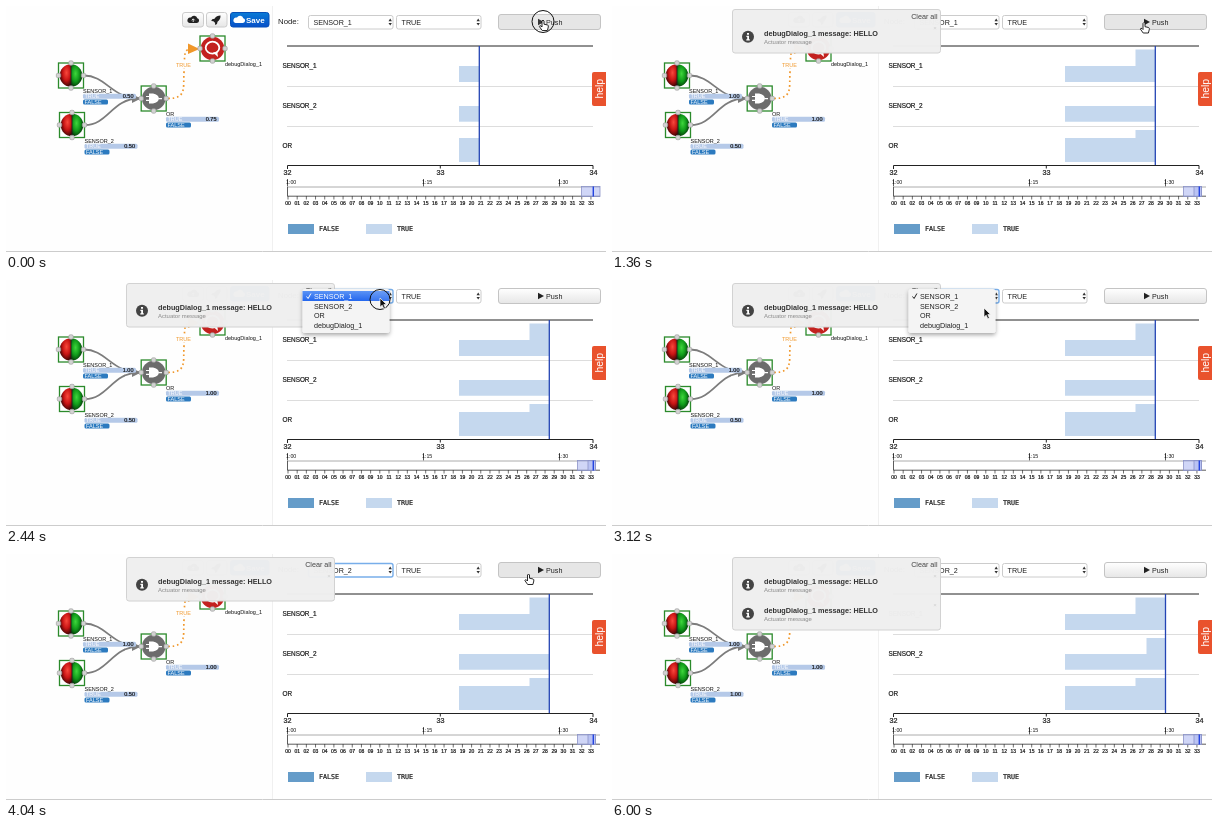
Write an HTML page that moves like this. It is 600 px wide and 246 px high and loops after 6.04 s.

```html
<!DOCTYPE html>
<html lang="en">
<head>
<meta charset="utf-8">
<title>Sensor network</title>
<style>
html, body { margin: 0; width: 100%; height: 100%; overflow: hidden; background: #fff; }
svg { display: block; width: 600px; height: 246px; }
text { font-family: "Liberation Sans", Arial, sans-serif; font-size: 7.2px; fill: #222; white-space: pre; }
.node { font-size: 5.5px; fill: #111; }
.strong { stroke: #222; stroke-width: .22; }
.mono { font-family: "DejaVu Sans Mono", monospace; font-size: 6.7px; }
.white { fill: #fff; }
</style>
</head>
<body>
<svg id="stage" viewBox="0 0 600 246">
<defs>
  <linearGradient id="btn" x2="0" y2="1"><stop stop-color="#fff"/><stop offset="1" stop-color="#e6e6e6"/></linearGradient>
  <linearGradient id="save" x2="0" y2="1"><stop stop-color="#0a7bd6"/><stop offset="1" stop-color="#0750c8"/></linearGradient>
  <linearGradient id="pick" x2="0" y2="1"><stop stop-color="#5b93f5"/><stop offset="1" stop-color="#2467ee"/></linearGradient>
  <radialGradient id="red" cx=".6" cy=".38" r=".68"><stop stop-color="#f8483c"/><stop offset=".5" stop-color="#c81414"/><stop offset="1" stop-color="#200202"/></radialGradient>
  <radialGradient id="green" cx=".4" cy=".42" r=".68"><stop stop-color="#3ed63c"/><stop offset=".5" stop-color="#109a1a"/><stop offset="1" stop-color="#021c04"/></radialGradient>
  <filter id="shadow" x="-10%" y="-10%" width="120%" height="130%"><feDropShadow dx="0" dy="2" stdDeviation="2" flood-opacity=".35"/></filter>
</defs>
<g id="graph"></g>
<g id="chart"></g>
<g id="bars"></g>
<path id="now" stroke="#2344b4" stroke-width="1.3"/>
<g id="brush"></g>
<g id="form"></g>
<g id="panel"></g>
<g id="menu"></g>
<g id="help"><rect x="586" y="66" width="16" height="34" rx="2" fill="#e9522d"/>
  <text class="white" transform="translate(596.5 92.5) rotate(-90)" style="font-size:10.4px">help</text></g>
<circle id="ring" fill="#fff" fill-opacity=".1" stroke="#111" stroke-width="1"/>
<g id="hand"><path d="M-1 1Q0-1 1 1V4.2L4.6 5Q5.6 5.4 5.3 7L4.4 10.5H-.8L-3.6 6.6Q-3.4 5.2-2 6L-1 7Z" fill="#fff" stroke="#111" stroke-width=".9"/></g>
<g id="arrow"><path d="M0 0V9.2L2.2 7.2L3.8 10.8L5.4 10L3.8 6.6H6.6Z" fill="#111" stroke="#fff" stroke-width=".7"/></g>
</svg>
<script>
const LOOP = 6040, STEP = 40;
const $ = id => document.getElementById(id);

const rect = (x, y, w, h, fill, extra = '') =>
  `<rect x="${x}" y="${y}" width="${w}" height="${h}" fill="${fill}" ${extra}/>`;
const line = (d, color, w = 1, extra = '') =>
  `<path d="${d}" fill="none" stroke="${color}" stroke-width="${w}" ${extra}/>`;
const shape = (d, fill, extra = '') => `<path d="${d}" fill="${fill}" ${extra}/>`;
const label = (x, y, s, extra = '') => `<text x="${x}" y="${y}" ${extra}>${s}</text>`;
const END = 'text-anchor="end"', MID = 'text-anchor="middle"';

// Node graph
function frame(x, y) {
  const ports = [[0, -12.5], [12.5, 0], [0, 12.5], [-12.5, 0]];
  return rect(x - 12.5, y - 12.5, 25, 25, 'none', 'stroke="#2b8a2b" stroke-width="1.3"') +
    ports.map(([dx, dy]) => rect(x + dx - 2.2, y + dy - 2.2, 4.4, 4.4, '#d2d2d2',
      'rx="1.4" stroke="#999" stroke-width=".6"')).join('');
}

function ball(x, y) {
  return shape(`M${x} ${y - 11.3}a11.3 11.3 0 0 0 0 22.6z`, 'url(#red)') +
    shape(`M${x} ${y - 11.3}a11.3 11.3 0 0 1 0 22.6z`, 'url(#green)') +
    line(`M${x} ${y - 11.3}v22.6`, '#222', .8) + frame(x, y);
}

function belief(x, y, name, id) {
  return label(x, y, name, 'class="node"') +
    rect(x, y + 1, 53, 5, '#b5c9e8', 'rx="1.5"') +
    rect(x, y + 6.6, 25, 5.2, '#2c7abf', 'rx="1.5"') +
    label(x + 1.5, y + 5.5, 'TRUE', 'class="node white"') +
    label(x + 1.5, y + 11.2, 'FALSE', 'class="node white"') +
    label(x + 50.5, y + 5.5, '', `class="node strong" id="${id}" ${END}`);
}

function button(x, w, fill = 'url(#btn)', stroke = '#ccc') {
  return rect(x + .5, 6.5, w - 1, 14.5, fill, `rx="2.5" stroke="${stroke}"`);
}
const cloud = (x, fill) =>
  shape(`M${x} 17h7.5a2.4 2.4 0 0 0 .3-4.7a3.4 3.4 0 0 0-6.3-.7a2.7 2.7 0 0 0-1.5 5.4z`, fill);

$('graph').innerHTML =
  rect(0, 0, 266, 246, '#fefefe') + line('M266.5 0V246', '#f0f0f0') + line('M0 245.5H600', '#ccc') +
  button(176, 22) + cloud(183.5, '#222') + line('M187.2 16v-3m-1.5 1.3l1.5-1.5l1.5 1.5', '#fff', .8) +
  button(200, 21.5) +
  shape('M214.5 9.5q-4 0-6 3.2l-2.3.5l-1 1.8l2.2.2l1.6 1.6l.2 2.2l1.8-1l.5-2.3q3.2-2.2 3-6.2z', '#222') +
  button(224, 39.5, 'url(#save)', '#0650b8') + cloud(229.5, '#fff') +
  label(240, 16.8, 'Save', 'class="white" font-weight="700" style="font-size:8px"') +
  line('M78 69.5C100 69.5 106 92.5 133 92.5', '#7c7c7c', 1.8) +
  line('M79 119C102 119 106 92.5 133 92.5', '#7c7c7c', 1.8) +
  shape('M126 88.3l9 4.3l-9 4.3z', '#7c7c7c') +
  line('M162 92.5C181 92.5 177 82 178 66C179 47 177 43 187 43', '#f0972a', 1.7, 'stroke-dasharray="1.7 2.8"') +
  shape('M182 37.5l11.5 5.5l-11.5 5z', '#f0972a') +
  rect(169, 56, 16, 6, '#fefefe') +
  label(170, 61.3, 'TRUE', 'class="node" style="fill:#f0972a"') +
  ball(65, 69.5) + ball(66, 119) +
  '<circle cx="147.7" cy="92.5" r="11.8" fill="#6c6c6c"/>' +
  shape('M143 87.5h4q5.5 1 6 5q-.5 4-6 5h-4v-2.5h-3v-1.2h3v-2.7h-3v-1.2h3zM153 92h3v1.2h-3z', '#fff') +
  frame(147.7, 92.5) +
  '<circle cx="206.5" cy="42.5" r="11.8" fill="#c3211f"/>' +
  '<ellipse cx="206.5" cy="41.7" rx="6.8" ry="6" fill="none" stroke="#fff" stroke-width="1.8"/>' +
  shape('M207 46.5l5 4.5l-.8-5.5z', '#fff') + frame(206.5, 42.5) +
  label(219, 60, 'debugDialog_1', 'class="node"') +
  belief(77, 86.8, 'SENSOR_1', 'v1') + belief(78.5, 136.8, 'SENSOR_2', 'v2') + belief(160, 109.8, 'OR', 'v3');

// Timeline chart
const minutes = Array.from({ length: 34 }, (_, i) => {
  const x = 282 + i * 9.18;
  return line(`M${x} 190v3.5`, '#333', .7) +
    label(x, 199, String(i).padStart(2, '0'), `${MID} class="node strong" style="font-size:5px"`);
}).join('');

$('chart').innerHTML =
  line('M281 40H587', '#222') + line('M281 80.5H587M281 120.5H587', '#ddd') +
  ['SENSOR_1', 'SENSOR_2', 'OR'].map((s, i) =>
    label(276.5, 61.5 + 40 * i, s, 'class="strong" style="font-size:6.4px"')).join('') +
  line('M281.5 163V159.5H587V163M434.3 159.5v3', '#222') +
  [32, 33, 34].map((n, i) => label(281.5 + i * 153, 169, n, `${MID} class="strong"`)).join('') +
  ['1:00', '1:15', '1:30'].map((s, i) => {
    const x = 281.5 + i * 136;
    return line(`M${x} 173v7.5`, '#333', .8) +
      label(x - 1.5, 178, s, 'class="node" style="font-size:5.3px"');
  }).join('') +
  line('M281.5 181H594', '#999', .8) + line('M281.5 181v9.2H594', '#333', .8) + minutes +
  rect(282, 218, 26, 10, '#659cc9') + label(313, 225.3, 'FALSE', 'class="mono strong"') +
  rect(360, 218, 26, 10, '#c5d8ee') + label(391, 225.3, 'TRUE', 'class="mono strong"');

// Form
function select(x, id, text) {
  return rect(x + .5, 9.5, 84.5, 13.5, '#fff', `id="${id}Box" rx="2" stroke="#ccc"`) +
    label(x + 5.5, 18.8, text, `id="${id}"`) +
    shape(`M${x + 80.5} 15.2l1.7-2.6l1.7 2.6zm0 1.8l1.7 2.6l1.7-2.6z`, '#333');
}
$('form').innerHTML = label(272, 18.3, 'Node:', 'style="font-size:7.8px"') +
  select(302, 'node', 'SENSOR_1') + select(390, 'value', 'TRUE') +
  rect(492.5, 8.5, 102, 15, 'url(#btn)', 'id="push" rx="2.5" stroke="#c4c4c4"') +
  shape('M532 12.8l6 3.2l-6 3.2z', '#222') + label(540, 18.8, 'Push');

// Notifications
const notice = y =>
  `<circle cx="136" cy="${y + 1}" r="6" fill="#444"/>` +
  shape(`M135 ${y - 2.8}h2v1.8h-2zM134.4 ${y}h2.6v3.6h.8v1.2h-3.5v-1.2h.9v-2.4h-.8z`, '#fff') +
  label(152, y, 'debugDialog_1 message: HELLO', 'font-weight="700" style="font-size:7.25px;fill:#333"') +
  label(152, y + 8.3, 'Actuator message', 'style="font-size:5.95px;fill:#888"') +
  label(323, y - 5.5, '×', `${MID} style="font-size:6px;fill:#ccc"`);
$('panel').innerHTML =
  rect(120.5, 3.5, 208, 43.5, '#efefef', 'id="sheet" fill-opacity=".98" rx="2.5" stroke="#d2d2d2"') +
  label(325.5, 13, 'Clear all', `${END} style="fill:#444"`) +
  notice(29.7) + `<g id="second">${notice(58.7)}</g>`;

// Dropdown
const rows = ['SENSOR_1', 'SENSOR_2', 'OR', 'debugDialog_1'];
$('menu').innerHTML = rect(296.5, 9, 87, 44, '#f4f4f4', 'rx="2.5" filter="url(#shadow)"') +
  rect(296.5, 11, 87, 10, 'url(#pick)', 'id="hover"') +
  line('M300.5 16.5l1.6 2l2.8-5', '#222', 1, 'id="tick"') +
  rows.map((s, i) => label(308, 18.8 + 9.8 * i, s, `id="row${i}"`)).join('');

// Motion tables
const pointer = [[0, 537, 14], [320, 537, 14], [800, 532, 16.5], [1440, 532, 16.5], [2240, 374, 18], [2640, 374, 18],
  [2920, 372, 28], [3320, 372, 28], [3960, 522, 20], [4120, 523, 20], [4640, 534, 16.5], [LOOP, 534, 16.5]];
// start, end, first radius, last radius
const clicks = [[0, 120, 11, 8], [2360, 2520, 13, 7], [2960, 3080, 10, 6], [4960, 5160, 17, 15]];
const HIT1 = 400, HIT2 = 5320, OPEN = 2360, CLOSE = 3200;

const clamp = v => Math.max(0, Math.min(1, v));
const ramp = (t, a, b) => clamp((t - a) / (b - a));
const show = (id, o) => $(id).setAttribute('opacity', o);
const set = (id, attrs) => { for (const k in attrs) $(id).setAttribute(k, attrs[k]); };

function pointAt(t) {
  const i = pointer.findIndex((p, n) => n && t <= p[0]);
  const [a, b] = [pointer[i - 1], pointer[i]];
  const k = ramp(t, a[0], b[0]), e = k * k * (3 - 2 * k);
  return [a[1] + (b[1] - a[1]) * e, a[2] + (b[2] - a[2]) * e];
}

// A series that rises from a low to a high level at one x
function series(end, rise, low, high, base) {
  const top = end > rise ? `H${rise}V${high}` : '';
  return shape(`M453 ${base}V${low}${top}H${end}V${base}z`, '#c5d8ee');
}

function draw(t) {
  const one = t >= HIT1, two = t >= HIT2;
  const x = two ? 553.5 : one ? 543.3 : 473.3;
  $('bars').innerHTML = series(x, 523.5, 60, 43.5, 76) +
    series(x, two ? 534.5 : 600, 100, 84, 115.7) + series(x, 523.5, 132, 124, 156);
  set('now', { d: `M${x} 40V159` });
  const brush = (bx, w) => rect(bx, 180.5, w, 10, '#a9b4f0',
    'fill-opacity=".55" stroke="#8c93c8" stroke-width=".8"');
  $('brush').innerHTML = (one ? brush(571.5, 18) + brush(582, 7.5) : brush(575.5, 18.5)) +
    line('M587.3 180.5v10', '#2344e0', 1.4);
  $('v1').textContent = one ? '1.00' : '0.50';
  $('v2').textContent = two ? '1.00' : '0.50';
  $('v3').textContent = one ? '1.00' : '0.75';

  show('panel', ramp(t, HIT1, HIT1 + 240));
  set('sheet', { height: 43.5 + 29 * ramp(t, HIT2, HIT2 + 200) });
  show('second', ramp(t, HIT2 + 80, HIT2 + 280));

  const [px, py] = pointAt(t);
  const gone = t >= 5640;
  const overPush = px > 492 && !gone;
  const focus = t >= OPEN && t < 5200;
  set('nodeBox', { stroke: focus ? '#78aeea' : '#ccc', 'stroke-width': focus ? 1.4 : 1 });
  $('node').textContent = t >= CLOSE ? 'SENSOR_2' : 'SENSOR_1';
  set('push', { fill: overPush ? '#e6e6e6' : 'url(#btn)' });

  show('menu', t < OPEN ? 0 : 1 - ramp(t, CLOSE, CLOSE + 160));
  const blink = t >= 3080 && t < 3160;
  const row = blink ? -1 : py > 21 ? 1 : 0;
  show('hover', blink ? 0 : 1);
  set('hover', { y: 11 + 9.8 * Math.max(row, 0) });
  rows.forEach((_, i) => { $('row' + i).style.fill = i === row ? '#fff' : '#222'; });
  set('tick', { stroke: row === 0 ? '#fff' : '#222' });

  const move = `translate(${px} ${py})`;
  set('hand', { transform: move });
  set('arrow', { transform: move });
  show('hand', overPush ? 1 : 0);
  show('arrow', overPush || gone ? 0 : 1);
  const c = clicks.find(c => t >= c[0] && t < c[1]);
  show('ring', c ? 1 : 0);
  if (c) set('ring', { cx: px, cy: py + 1.5, r: c[2] + (c[3] - c[2]) * ramp(t, c[0], c[1]) });
}

const start = performance.now();
function tick() {
  const t = (performance.now() - start) % LOOP;
  draw(Math.floor(t / STEP) * STEP);
  requestAnimationFrame(tick);
}
tick();
</script>
</body>
</html>
```
